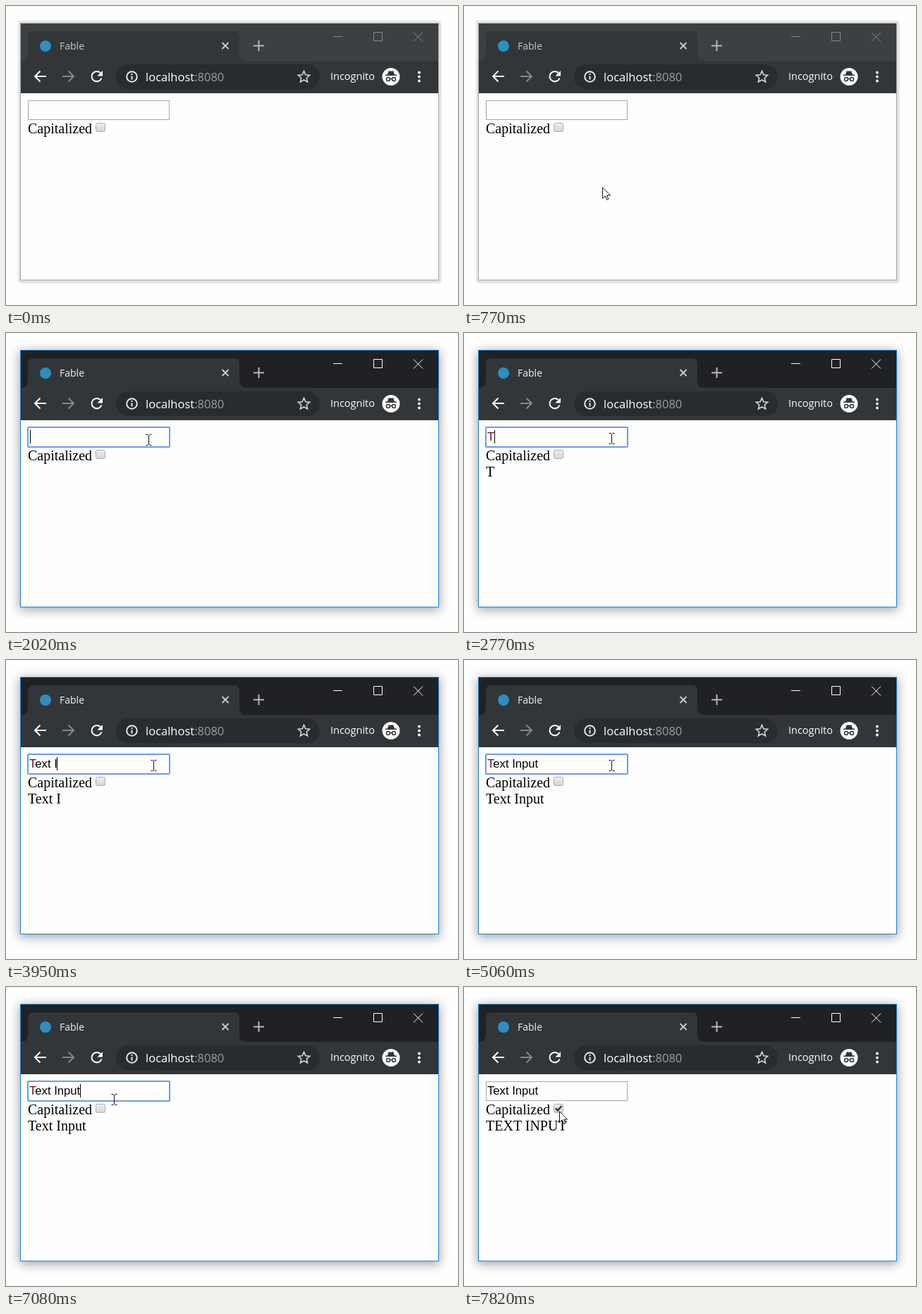
Recreate the animation shown at these times as an HTML page. Size 641 px wide and 425 px high, loop 8000 ms.

```html
<!DOCTYPE html>
<html lang="en">
<head>
<meta charset="utf-8">
<title>Text input demo</title>
<style>
  html, body { margin: 0; width: 100%; height: 100%; overflow: hidden; background: #fefefe; }
  svg { display: block; }
  text { white-space: pre; }
  .ui { font-family: "Open Sans", "Noto Sans", sans-serif; }
  .page { font: 20px "Liberation Serif", "Times New Roman", serif; }
  .field { font: 16.67px "Liberation Sans", Arial, sans-serif; }
  .line { fill: none; stroke-width: 2; }
  #shadow { box-shadow: 0 0 2px 3px #e2e2e2, 1px 2px 3px 1px #d2d2d2; }
  .active #shadow { box-shadow: 0 3px 14px 1px rgba(0, 0, 0, .36); }
  #frame { fill: #3c4043; }
  .active #frame { fill: #202124; }
  #border { fill: none; stroke: #a6a6a6; }
  .active #border { stroke: #1883d7; }
  #controls { fill: none; stroke: #85888a; }
  .active #controls { stroke: #fff; }
  #tabTitle { fill: #c4c6c8; }
  .active #tabTitle { fill: #f1f3f4; }
</style>
</head>
<body>
<svg id="stage" width="641" height="425" viewBox="0 0 641 425">
  <defs>
    <linearGradient id="button" x2="0" y2="1">
      <stop stop-color="#eee"/><stop offset="1" stop-color="#d4d4d4"/>
    </linearGradient>
  </defs>
  <foreignObject width="641" height="425">
    <div id="shadow" style="position:absolute;left:20px;top:24px;width:594px;height:366px"></div>
  </foreignObject>
  <rect x="20" y="24" width="594" height="366" fill="#fefefe"/>
  <rect id="frame" x="20" y="24" width="594" height="54"/>
  <path d="M21 78Q31 78 31 68V44Q31 36 39 36H323Q331 36 331 44V68Q331 78 341 78H613V124H21Z" fill="#323639"/>
  <rect id="border" x="20.5" y="24.5" width="593" height="365"/>

  <circle cx="56" cy="57" r="8" fill="#2c8fbf"/>
  <text id="tabTitle" class="ui" x="76" y="62" font-size="14">Fable</text>
  <path class="line" d="M306.500 52l9 9m0-9l-9 9" stroke="#c8cacc" stroke-width="1.800"/>
  <path class="line" d="M351 56.500h15M358.500 49v15" stroke="#b7babc"/>
  <path id="controls" d="M464 43.500h13M521.500 37.500h12v12h-12ZM578 37.500l13 13m0-13l-13 13"/>

  <path class="line" d="M57 100H41.500M48.500 92.500L41 100l7.500 7.500" stroke="#fff"/>
  <path class="line" d="M80 100H95.500M88.500 92.500L96 100l-7.500 7.500" stroke="#85888b"/>
  <path class="line" d="M133.800 95A7.200 7.200 0 1 0 135.500 102.500" stroke="#fff"/>
  <path d="M137 92v7.500h-7.500Z" fill="#fff"/>
  <rect x="156" y="83" width="289" height="35" rx="17.500" fill="#282c2f"/>
  <circle class="line" cx="178.500" cy="100.500" r="7.300" stroke="#e8eaed"/>
  <path class="line" d="M178.500 99.500v5M178.500 96v2" stroke="#e8eaed"/>
  <text class="ui" x="198" y="106.500" font-size="16.500" fill="#fff">localhost<tspan fill="#9aa0a6">:8080</tspan></text>
  <path id="star" fill="none" stroke="#d5d7da" stroke-width="1.600"/>
  <text class="ui" x="460" y="105" font-size="14.500" fill="#fff">Incognito</text>
  <circle cx="546" cy="100.500" r="12.500" fill="#fff"/>
  <path d="M538 99v-1.500h3l1.500-5h7l1.500 5h3V99Z" fill="#323639"/>
  <g fill="none" stroke="#323639" stroke-width="1.500">
    <circle cx="542" cy="104" r="2.500"/><circle cx="550" cy="104" r="2.500"/><path d="M544.500 103.500h3"/>
  </g>
  <g fill="#fff">
    <circle cx="586" cy="94.500" r="1.900"/><circle cx="586" cy="100.500" r="1.900"/><circle cx="586" cy="106.500" r="1.900"/>
  </g>

  <rect x="31.500" y="134.500" width="200" height="27" fill="#fefefe" stroke="#a6a6a6"/>
  <rect id="ring" x="31" y="134" width="201" height="28" rx="1" fill="none" stroke="#6b9ce8" stroke-width="2"/>
  <text class="field" x="33" y="153"><tspan id="initial"></tspan><tspan id="rest"></tspan></text>
  <rect id="caret" y="138" width="1" height="19"/>
  <text class="page" x="31" y="181">Capitalized</text>
  <rect x="127.500" y="166.500" width="13" height="12" rx="2" fill="url(#button)" stroke="#adadad"/>
  <path id="tick" d="M130 172.500l3 3 5.500-6.500" fill="none" stroke="#3c3c3c" stroke-width="2.600"/>
  <text id="output" class="page" x="31" y="204"></text>

  <path id="arrow" d="M.5.8V16.500L4.200 13l2.500 5.500 2.200-1L6.500 12.200H11.600Z" fill="#fff" stroke="#111"/>
  <path id="beam" d="M-3.500-7.500h3m2 0h3M-3.500 7.500h3m2 0h3M.5-7V7" fill="none" stroke="#111"/>
</svg>
<script>
const LOOP = 8000;
const PHRASE = "Text Input";
const KEY_TIMES = [2770, 2910, 3140, 3350, 3490, 3950, 4110, 4330, 4520, 4560];
const FOCUS = 2020, CLICK = 7790;
const CARET_ON = [[FOCUS, 2510], [2770, 5060], [5550, 6210], [6740, 7270]];

// Pointer positions: time, x, y
const POINTER = [
  [190, 377, 400], [450, 265, 350], [600, 215, 298], [770, 196, 257], [900, 196, 237],
  [1000, 195, 237], [1780, 194, 166], [1810, 197, 160], [1940, 200, 153], [2360, 209, 150],
  [5550, 209, 150], [5610, 195, 137], [5830, 195, 137], [5850, 187, 130], [6020, 180, 120],
  [6180, 177, 129], [6620, 168, 147], [6720, 168, 147], [7500, 135, 176], [LOOP, 135, 176]
];

const el = id => document.getElementById(id);
const show = (id, on) => el(id).setAttribute("visibility", on ? "visible" : "hidden");
const pen = document.createElement("canvas").getContext("2d");
pen.font = '16.67px "Liberation Sans", Arial, sans-serif';

el("star").setAttribute("d", "M" + Array.from({ length: 10 }, (_, i) => {
  const a = i * Math.PI / 5, r = i % 2 ? 4 : 8.6;
  return `${422.5 + r * Math.sin(a)} ${101 - r * Math.cos(a)}`;
}).join("L") + "Z");

function pointerAt(t) {
  const i = POINTER.findIndex(key => key[0] > t);
  const [t0, x0, y0] = POINTER[i - 1], [t1, x1, y1] = POINTER[i];
  const k = (t - t0) / (t1 - t0);
  return [x0 + (x1 - x0) * k, y0 + (y1 - y0) * k].map(Math.round);
}

function drawPointer(t) {
  const visible = t >= POINTER[0][0];
  const [x, y] = visible ? pointerAt(t) : [0, 0];
  const overField = x >= 31 && x < 232 && y >= 134 && y < 162;
  for (const id of ["arrow", "beam"]) {
    el(id).setAttribute("transform", `translate(${x} ${y})`);
    show(id, visible && (id === "beam") === overField);
  }
}

function render(t) {
  const typed = PHRASE.slice(0, KEY_TIMES.filter(k => k <= t).length);
  const clicked = t >= CLICK;
  el("stage").classList.toggle("active", t >= FOCUS);
  show("ring", t >= FOCUS && !clicked);
  show("tick", clicked);
  el("initial").textContent = typed.slice(0, 1);
  el("initial").setAttribute("fill", clicked ? "#000" : "#6e1016");
  el("rest").textContent = typed.slice(1);
  el("output").textContent = clicked ? typed.toUpperCase() : typed;
  el("caret").setAttribute("x", typed ? Math.floor(33 + pen.measureText(typed).width) : 34);
  show("caret", CARET_ON.some(([from, to]) => t >= from && t < to));
  drawPointer(t);
}

const start = performance.now();
function tick() {
  render((performance.now() - start) % LOOP);
  requestAnimationFrame(tick);
}
tick();
</script>
</body>
</html>
```
